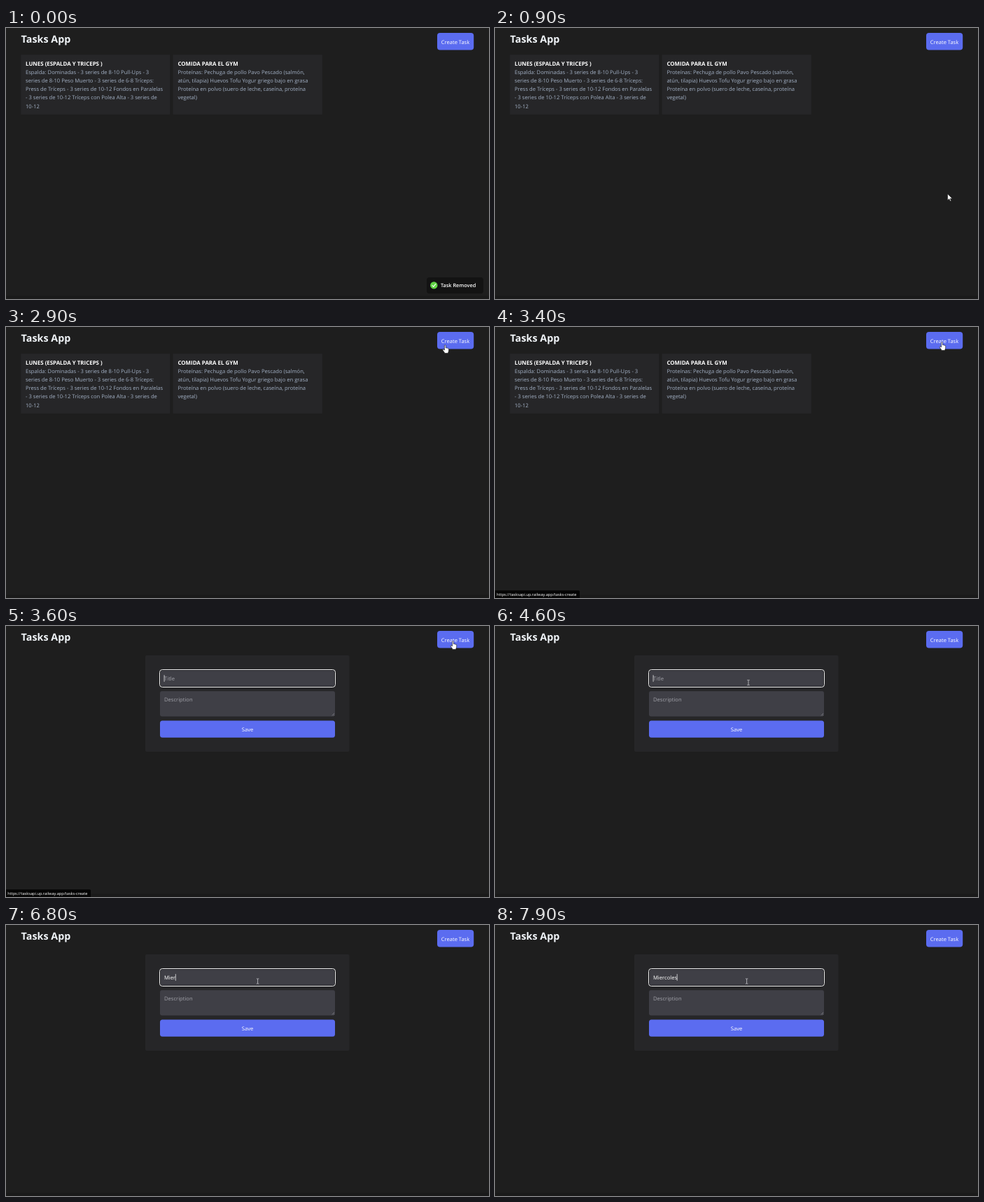
Animation of 690 by 388 pixels, one loop 8 s. Source, as an HTML page:

```html
<!DOCTYPE html>
<html lang="es">
<head>
<meta charset="utf-8">
<title>Tasks App</title>
<style>
  html, body { margin: 0; width: 100%; height: 100%; overflow: hidden; background: #1e1e1e; }
  svg { display: block; width: 100%; height: 100%; }
  text { font: 7.62px "Open Sans", "Noto Sans", sans-serif; fill: #fff; text-rendering: geometricPrecision; }
  .title { font-size: 14.35px; font-weight: 700; fill: #f1f5f9; }
  .head { font-size: 7.92px; font-weight: 700; }
  .body { fill: #a3b1c5; }
  .hint { fill: #a2a3aa; }
  .mid { text-anchor: middle; }
  .card { fill: #262628; }
  .field { fill: #3f3f46; }
  .button { fill: #5b6cf0; }
  .pointer { fill: #fff; stroke: #111; stroke-width: .6; stroke-linejoin: round; }
</style>
</head>
<body>
<svg viewBox="0 0 690 388" xmlns="http://www.w3.org/2000/svg">
  <rect width="690" height="388" fill="#1e1e1e"/>
  <rect y="383.5" width="690" height="4.5" fill="#1a1a1a"/>
  <text class="title" x="21.6" y="21.4">Tasks App</text>
  <rect class="button" x="616" y="7" width="52.2" height="24.4" rx="4"/>
  <text class="mid" x="642" y="22.5" style="font-size:7.55px">Create Task</text>

  <g id="list">
    <rect class="card" x="21.3" y="38.3" width="213" height="85.5"/>
    <rect class="card" x="238.6" y="38.3" width="213.2" height="85.5"/>
  </g>

  <g id="form">
    <rect class="card" x="199" y="42" width="291.5" height="138" rx="2"/>
    <rect x="219.5" y="62.5" width="251" height="25" rx="3.8" fill="#18181b" stroke="#f0f0f0"/>
    <rect class="field" x="220.8" y="63.8" width="248.4" height="22.4" rx="2.6"/>
    <text id="titleHint" class="hint" x="226" y="77.8">Title</text>
    <text id="typed" x="226" y="77.8"></text>
    <rect id="caret" y="70.2" width=".7" height="9.6" fill="#fff"/>
    <rect class="field" x="220" y="93.3" width="250" height="36.2" rx="3"/>
    <text class="hint" x="226" y="108.1">Description</text>
    <path d="M465.6 128.4l3.4-3.4M467.6 128.4l1.4-1.4" stroke="#a5a5aa" stroke-width=".5"/>
    <rect class="button" x="220" y="135.6" width="250" height="24.2" rx="3.5"/>
    <text class="mid" x="345" y="150.5">Save</text>
  </g>

  <g id="toast">
    <rect x="601" y="357" width="81" height="23.2" rx="4" fill="#131313"/>
    <circle cx="611.3" cy="368.4" r="5.2" fill="#61d345"/>
    <path d="M609 368.6l1.7 1.7 3-3.6" fill="none" stroke="#fff" stroke-width="1.1" stroke-linecap="round" stroke-linejoin="round"/>
    <text x="621" y="371.1" style="font-size:7.3px;font-weight:600">Task Removed</text>
  </g>

  <g id="status">
    <path d="M0 377.3H119.5q1.5 0 1.5 1.5V388H0z" fill="#050505"/>
    <text x="2.2" y="385" style="font-size:5.65px;font-weight:500">https://tasksapi.up.railway.app/tasks-create</text>
  </g>

  <path id="arrow" class="pointer" d="M0 0V9.3L2.2 7.3 3.7 10.6 5.1 10 3.7 6.8H6.7z"/>
  <path id="hand" class="pointer" d="M-.9.7Q-.8-.2 0-.2T.9.7V3.9Q1.9 3.3 2.4 4.2 3.3 3.7 3.9 4.6 5 4.3 5.2 5.5V8Q5.2 9.3 4.4 10.2V11.6H-.9V10.4L-3.3 7.2Q-3.7 6.3-2.9 6-2.2 5.8-1.5 6.6L-.9 7.2z"/>
  <path id="beam" d="M-1.7-3.6H-.5L0-3.2 .5-3.6H1.7M0-3.2V3.2M-1.7 3.6H-.5L0 3.2 .5 3.6H1.7" fill="none" stroke="#dedee2" stroke-width=".7"/>
</svg>
<script>
const LOOP = 8000, STEP = 100;
const $ = id => document.getElementById(id);

const cards = [
  [28, "LUNES (ESPALDA Y TRICEPS )", [
    "Espalda: Dominadas - 3 series de 8-10 Pull-Ups - 3",
    "series de 8-10 Peso Muerto - 3 series de 6-8 Tríceps:",
    "Press de Tríceps - 3 series de 10-12 Fondos en Paralelas",
    "- 3 series de 10-12 Tríceps con Polea Alta - 3 series de",
    "10-12"]],
  [245.4, "COMIDA PARA EL GYM", [
    "Proteínas: Pechuga de pollo Pavo Pescado (salmón,",
    "atún, tilapia) Huevos Tofu Yogur griego bajo en grasa",
    "Proteína en polvo (suero de leche, caseína, proteína",
    "vegetal)"]]
];

function addText(cls, x, y, str) {
  const el = document.createElementNS("http://www.w3.org/2000/svg", "text");
  el.setAttribute("class", cls);
  el.setAttribute("x", x);
  el.setAttribute("y", y);
  el.textContent = str;
  $("list").append(el);
}
for (const [x, head, lines] of cards) {
  addText("head", x, 53.6, head);
  lines.forEach((line, i) => addText("body", x, 65.7 + 12.2 * i, line));
}

// Pointer hotspot: time, x, y
const route = [
  [700, 694, 330], [1000, 630, 205], [1200, 583, 117], [1400, 600, 62], [1600, 624, 27],
  [2100, 624, 27], [2200, 624.5, 27], [2700, 624.5, 27], [3400, 638.5, 21.9],
  [3800, 638.5, 21.9], [4600, 362, 81], [4700, 359.6, 80.5], [4800, 359.6, 83],
  [5100, 359.6, 83], [5300, 359.6, 80.5]
];
const word = "Miercoles";
const keyTimes = [6200, 6400, 6700, 6800, 7000, 7100, 7300, 7700, 7900];

const clamp = v => Math.min(1, Math.max(0, v));
const ramp = (t, a, b) => clamp((t - a) / (b - a));
const smooth = p => p * p * (3 - 2 * p);
const show = (id, on) => { $(id).style.display = on ? "" : "none"; };
const inside = (x, y, l, t, r, b) => x >= l && x <= r && y >= t && y <= b;

function pointerAt(t) {
  const i = route.findIndex(k => k[0] > t);
  if (i < 0) return route[route.length - 1].slice(1);
  if (i === 0) return route[0].slice(1);
  const [t0, x0, y0] = route[i - 1], [t1, x1, y1] = route[i];
  const p = smooth(ramp(t, t0, t1));
  return [x0 + (x1 - x0) * p, y0 + (y1 - y0) * p];
}

function drawPointer(t, formOpen) {
  const [x, y] = pointerAt(t);
  const overField = formOpen && inside(x, y, 220, 63, 470, 129);
  const shape = inside(x, y, 616, 7, 668, 31.5) ? "hand" : overField ? "beam" : "arrow";
  for (const id of ["arrow", "hand", "beam"]) show(id, id === shape && t >= 800);
  $(shape).setAttribute("transform", `translate(${x} ${y})`);
}

function drawToast(t) {
  const p = 1 - (1 - ramp(t, 700, 1100)) ** 3;
  show("toast", p < 1);
  $("toast").setAttribute("opacity", 1 - p);
  $("toast").setAttribute("transform",
    `translate(641.5 ${368.6 + 34.8 * p}) scale(${1 - 0.4 * p}) translate(-641.5 -368.6)`);
}

function drawInput(t) {
  const count = keyTimes.filter(k => k <= t).length;
  $("typed").textContent = word.slice(0, count);
  show("titleHint", count === 0);
  const width = count ? $("typed").getComputedTextLength() : 0;
  $("caret").setAttribute("x", 225.7 + width);
  show("caret", count > 0 || Math.floor((t - 3560) / 520) % 2 === 0);
}

function draw(t) {
  const formOpen = t >= 3600;
  show("list", !formOpen);
  show("form", formOpen);
  if (formOpen) drawInput(t);
  drawToast(t);
  $("status").setAttribute("opacity", ramp(t, 3000, 3300) * (1 - ramp(t, 4100, 4500)));
  drawPointer(t, formOpen);
}

const start = performance.now();
function tick() {
  const t = (performance.now() - start) % LOOP;
  draw(Math.floor(t / STEP) * STEP);
  requestAnimationFrame(tick);
}
tick();
</script>
</body>
</html>
```
